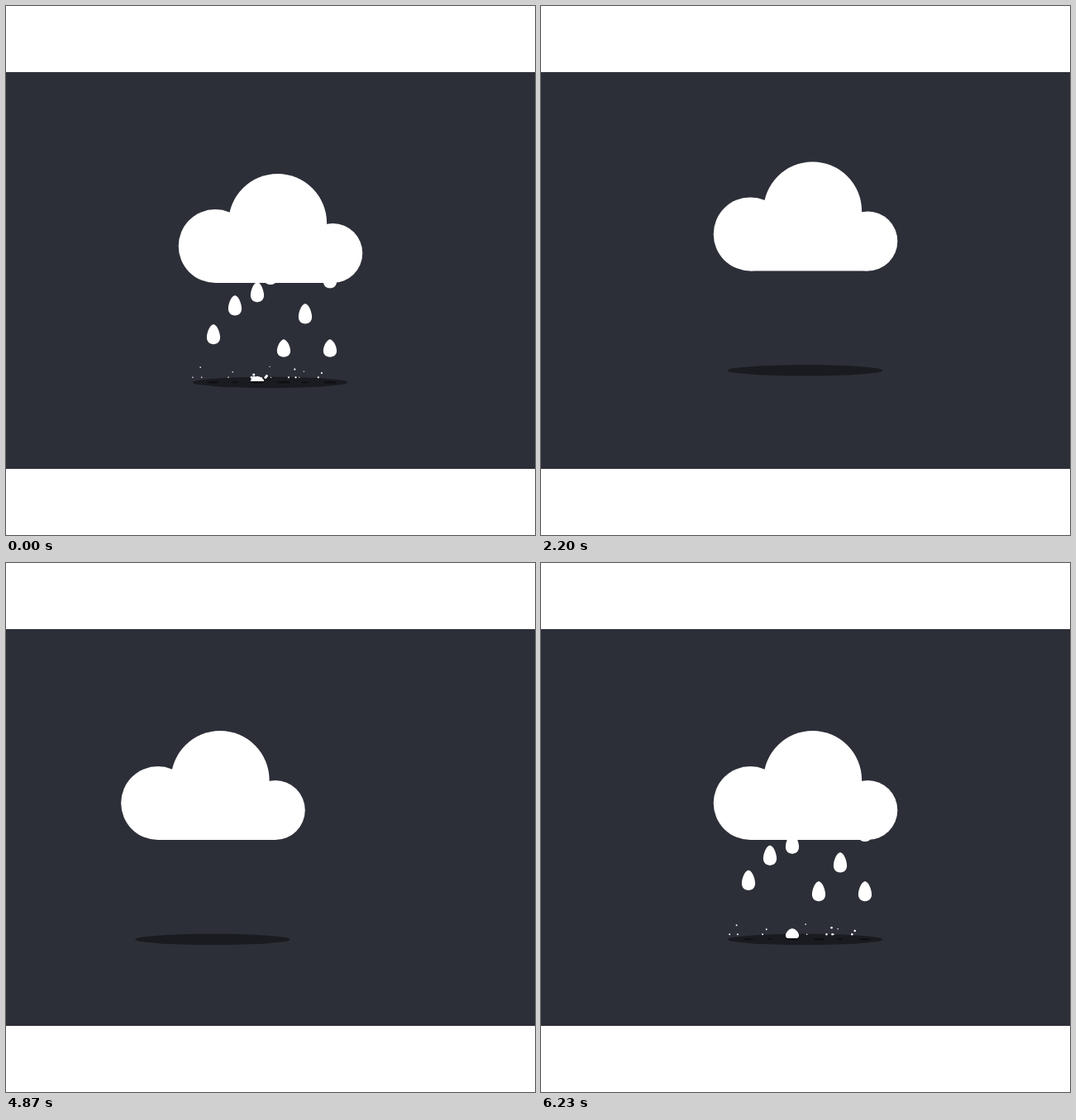
An HTML page with a canvas for the animation above (6260 ms loop, 640 by 640 pixels).

```html
<!DOCTYPE html>
<html lang="en">
<head>
<meta charset="utf-8">
<title>Storm cloud</title>
<style>
  html, body { margin: 0; width: 100%; height: 100%; overflow: hidden; background: #fff; }
  canvas { display: block; width: 100vw; height: 100vh; }
</style>
</head>
<body>
<canvas id="stage" width="640" height="640"></canvas>
<script>
const ctx = document.getElementById('stage').getContext('2d');
const LOOP = 6260, TICK = 33.3, GROUND = 454, REPEAT = 9;
const WHITE = '#fff', SKY = '#2d2f38', SHADE = '#1a1b20', DARK = '#0e0f13';

// Column: age in ticks of its first drop when the loop starts.
const SHOWER = { 251: 18, 277: 6, 304: 13, 320: 0, 336: 19, 362: 16, 392: 10 };
const DRIPS = { 277: -7, 320: -5, 336: -6, 392: -5, 352: -10, 314: -12.5, 293: -37, 346: -38 };
// How far each splash bead flies.
const BEADS = [[-34, 0], [-21.5, -16.5], [-19.5, 0], [22, -9], [15, 0]];
const BOLT = [[321.5, 335], [276, 372], [300.5, 383.5], [263, 460], [363.5, 379], [339.5, 367.5], [362, 320], [340, 320]];

const clamp = v => Math.max(0, Math.min(1, v));
const sine = u => (1 - Math.cos(Math.PI * u)) / 2;

// Columns that start early drip twice before the loop start.
const drops = Object.entries(SHOWER)
  .flatMap(([x, age]) => age < 10 ? [[+x, age]] : [[+x, age], [+x, age - REPEAT]])
  .concat(Object.entries(DRIPS).map(([x, age]) => [+x, age]));

function ellipse(x, y, rx, ry, color) {
  ctx.fillStyle = color;
  ctx.beginPath();
  ctx.ellipse(x, y, rx, ry, 0, 0, Math.PI * 2);
  ctx.fill();
}
const disc = (x, y, r) => ellipse(x, y, r, r, WHITE);

function clipped(x, y, w, h, paint) {
  ctx.save();
  ctx.beginPath();
  ctx.rect(x, y, w, h);
  ctx.clip();
  paint();
  ctx.restore();
}

// Rises, then swings back past rest and settles.
function hop(t, start, rise, height) {
  const s = (t - start) / rise, after = s - 1;
  if (s < 0 || after > 3.24) return 0;
  if (s < 1) return -height * sine(s);
  return -height * Math.exp(-0.85 * after) * Math.cos(Math.PI / 2 * after / 1.08);
}

function cloudOffset(t) {
  let x = 0, y = hop(t, 670, 145, 7.6) + hop(t, 1960, 300, 16);
  if (t > 3550 && t < 4490) x = 441 * Math.pow((t - 3550) / 920, 2.43);
  else if (t >= 4490 && t < 5370) x = -441 * Math.pow((5520 - t) / 1030, 4);
  else if (t > 5430 && t < 5930) {
    const fade = clamp((5930 - t) / 150);
    x = 4.5 * fade * Math.sin(t / 17);
    y = 5.5 * fade * Math.cos(t / 23);
  }
  return [x, y];
}

function drawCloud() {
  disc(253.2, 290.5, 44.5);
  disc(328.6, 262.5, 59.5);
  disc(395.3, 299, 36);
  ctx.fillRect(253, 290, 142.5, 45);
}

function drawDrop(x, age) {
  const h = 24 * (1 - Math.pow(clamp((age - 9) / 5), 1.3));
  if (h <= 0) return;
  const low = Math.min(GROUND, 310 + 27.1 * Math.pow(1.155, age));
  // A landed drop sinks into the ground, which cuts its base flat.
  const sunk = clamp((13 - h) / 5) * 0.4 * h;
  const top = low - h, full = h + sunk;
  const half = side => {
    const at = (dx, k) => [x + side * dx, top + full * k];
    ctx.moveTo(x, top);
    ctx.bezierCurveTo(...at(4, 0), ...at(8.1, 0.4), ...at(8.1, 0.65));
    ctx.bezierCurveTo(...at(8.1, 0.87), ...at(4.7, 1), ...at(0, 1));
  };
  clipped(x - 20, 0, 40, GROUND, () => {
    ctx.fillStyle = WHITE;
    ctx.beginPath();
    half(-1);
    half(1);
    ctx.fill();
    ctx.fillRect(x - 0.5, top, 1, full);
  });
}

function drawDropShade(x, age) {
  if (age < 2 || age > 14) return;
  const grow = Math.pow(Math.min(1, age / 10), 1.5) * clamp(14 - age);
  ellipse(x, 455.2, 8 * grow, 0.6 + 0.8 * grow, DARK);
}

function drawSplash(x, age) {
  if (age <= 0.2 || age >= 10.5) return;
  const out = 1 - Math.exp(-age / 4.5);
  const r = 1.75 * (1 - age / 11);
  for (const [dx, dy] of BEADS)
    disc(x + (dx > 0 ? 7 : 0) + dx * out, 449.3 + dy * out, r);
}

function drawBolt(t) {
  if (t < 5290 || t > 5560) return;
  clipped(0, 0, 640, 335 + 130 * clamp((t - 5290) / 70), () => {
    ctx.fillStyle = WHITE;
    ctx.beginPath();
    BOLT.forEach(p => ctx.lineTo(...p));
    ctx.fill();
  });
}

function drawRain(t) {
  const now = Math.round((t > 5000 ? t - LOOP : t) / TICK);
  const falling = drops.map(([x, age]) => [x, age + now])
    .filter(([, age]) => age > -1.5 && age < 23);
  falling.forEach(d => drawDropShade(...d));
  falling.forEach(d => drawDrop(...d));
  falling.forEach(([x, age]) => drawSplash(x, age - 12));
}

function drawScene(t) {
  ctx.fillStyle = SKY;
  ctx.fillRect(0, 80, 640, 480);

  const [cx, cy] = cloudOffset(t);
  ellipse(319.5 + cx, 455.4 + cy, 93.7, 6.7, SHADE);
  drawRain(t);

  ctx.save();
  ctx.translate(cx, cy);
  drawBolt(t);
  drawCloud();
  ctx.restore();

  if (t >= 5430 && t < 5560) {
    ctx.fillStyle = `rgba(255,255,255,${0.8 * (5560 - t) / 130})`;
    ctx.fillRect(0, 80, 640, 480);
  }
}

const begin = performance.now();
function tick() {
  ctx.fillStyle = WHITE;
  ctx.fillRect(0, 0, 640, 640);
  const t = (performance.now() - begin) % LOOP;
  clipped(0, 80, 640, 480, () => drawScene(t));
  requestAnimationFrame(tick);
}
tick();
</script>
</body>
</html>
```
